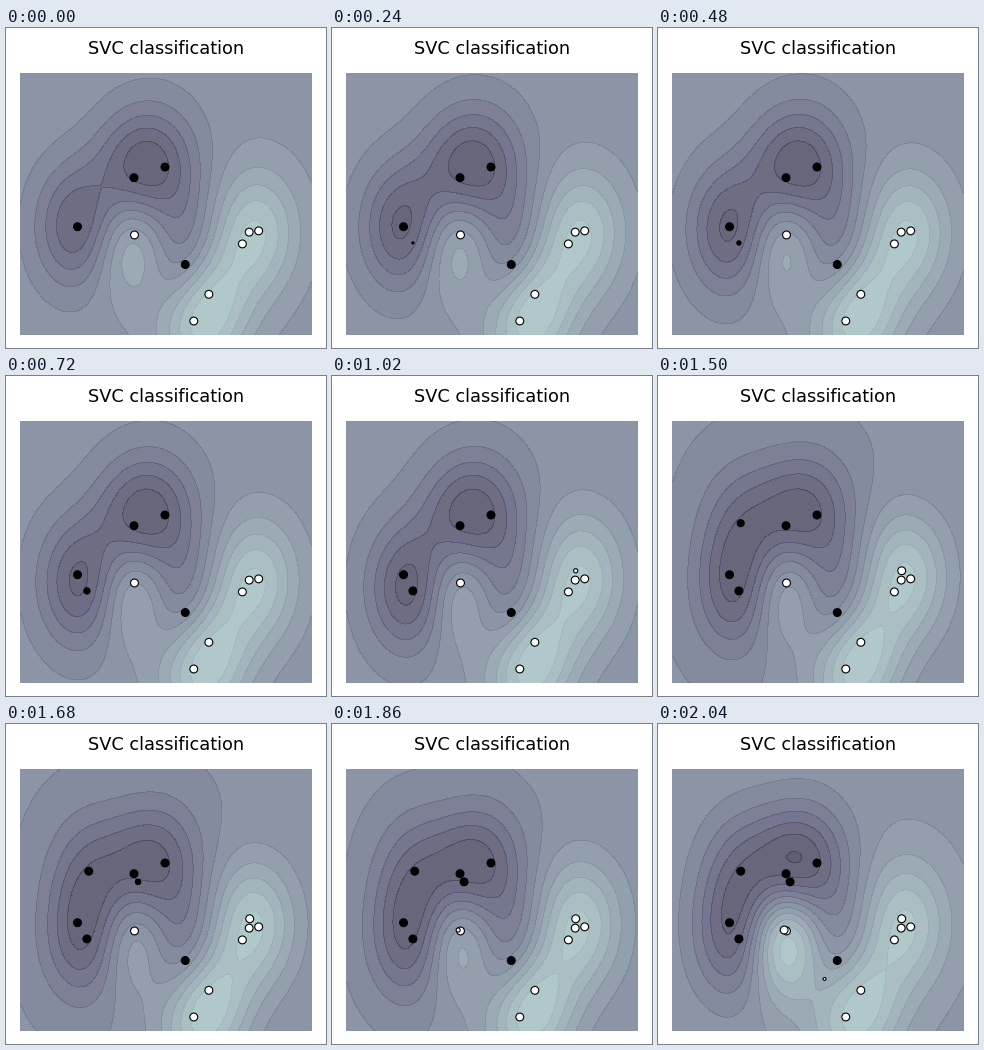
These frames come from a looping animation (320x320 px, 2.1 s). A matplotlib script:

```python
import matplotlib.pyplot as plt
import numpy as np
from matplotlib.animation import FuncAnimation

FRAMES, INTERVAL = 35, 60
FPS = 15          # pace of the training clock
START = 10        # points known from the beginning
GAMMA = 2


def make_moons(count, noise, seed):
    """Two interleaved, shuffled and jittered half circles with labels -1, 1."""
    rng = np.random.RandomState(seed)
    angle = np.linspace(0, np.pi, count // 2)
    outer = np.column_stack([np.cos(angle), np.sin(angle)])
    points = np.vstack([outer, (1, 0.5) - outer])
    labels = np.repeat([-1.0, 1.0], count // 2)
    order = np.arange(count)
    rng.shuffle(order)
    return points[order] + rng.normal(scale=noise, size=(count, 2)), labels[order]


def rbf(a, b):
    return np.exp(-GAMMA * (a[:, None] - b[None, :]) ** 2)


points, label = make_moons(50, noise=0.1, seed=2)
px, py = points.T
gx, gy = np.linspace(-2, 3, 500), np.linspace(-1, 2, 500)
KERNEL = rbf(px, px) * rbf(py, py)
GRID_X, GRID_Y = rbf(px, gx), rbf(gy, py)


def fit(weights, tol=1e-5, max_iter=20000):
    """Solve the weighted SVC dual by SMO; return coefficients and intercept."""
    low, high = np.minimum(0, weights * label), np.maximum(0, weights * label)
    coef, err = np.zeros(len(label)), label.copy()
    eps = 1e-12
    for _ in range(max_iter):
        up = np.where(coef < high - eps, err, -np.inf)
        down = np.where(coef > low + eps, err, np.inf)
        i, j = up.argmax(), down.argmin()
        gap = up[i] - down[j]
        if gap < tol:
            break
        step = min(gap / (2 - 2 * KERNEL[i, j]),
                   high[i] - coef[i], coef[j] - low[j])
        coef[i] += step
        coef[j] -= step
        err -= step * (KERNEL[i] - KERNEL[j])
    free = (coef > low + 1e-9) & (coef < high - 1e-9)
    bias = err[free].mean() if free.any() else (up[i] + down[j]) / 2
    return coef, bias


fig, ax = plt.subplots(figsize=(4, 4), dpi=80, facecolor="white")
fig.subplots_adjust(left=0, right=1, bottom=0, top=0.9)


def draw(frame):
    t = frame / FPS
    weights = np.clip(t ** 2 + START - np.arange(len(label)), 0, 1)
    coef, bias = fit(weights)
    score = (GRID_Y * coef) @ GRID_X + bias

    ax.clear()
    ax.axis("off")
    ax.set_title("SVC classification", fontsize=16, pad=5,
                 family="DejaVu Sans")
    ax.contourf(gx, gy, score, levels=np.linspace(-2, 2, 20), cmap="bone",
                alpha=0.8, vmin=-2.5, vmax=2.5, antialiased=False)
    on = weights > 0
    ax.scatter(px[on], py[on], s=50 * weights[on], c=label[on], cmap="bone",
               vmin=-1, vmax=1, edgecolors="black", linewidths=1)
    ax.set(xlim=(-2.25, 3.25), ylim=(-1.15, 2.15))
    return []


anim = FuncAnimation(fig, draw, frames=FRAMES, interval=INTERVAL,
                     init_func=lambda: [], repeat=True, repeat_delay=0)
plt.show()
```
